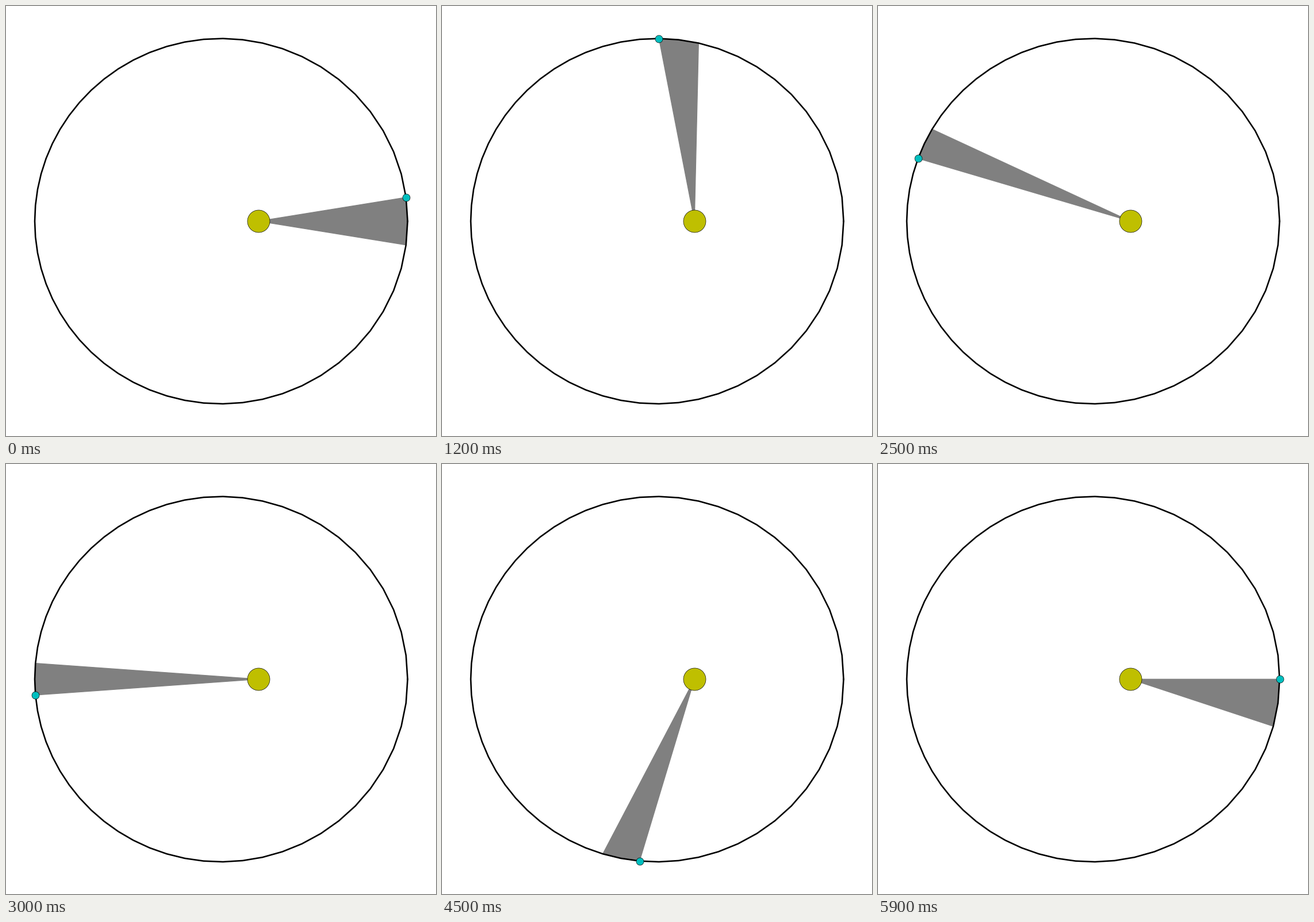
Recreate the animation shown at these times as a matplotlib script. Size 748 px wide and 748 px high, loop 6000 ms.

```python
import numpy as np
import matplotlib.pyplot as plt
from matplotlib.animation import FuncAnimation

SIZE = 748
DPI = 93.5
STEPS = 60
CENTER = 374.3
SEMI_MAJOR = 324.3
ECC = 0.2
SEMI_MINOR = SEMI_MAJOR * np.sqrt(1 - ECC ** 2)
FOCUS = (CENTER + ECC * SEMI_MAJOR, CENTER)


def position(step):
    """Point on the orbit after a number of equal time steps."""
    mean = 2 * np.pi * np.asarray(step) / STEPS
    anomaly = mean
    for _ in range(40):  # Kepler's equation by fixed-point iteration
        anomaly = mean + ECC * np.sin(anomaly)
    return (CENTER + SEMI_MAJOR * np.cos(anomaly),
            CENTER - SEMI_MINOR * np.sin(anomaly))


def sector(step):
    """Area swept between the previous and the next step."""
    rim = np.column_stack(position(np.arange(step - 1, step + 2)))
    return np.vstack([FOCUS, rim])


fig = plt.figure(figsize=(SIZE / DPI, SIZE / DPI), dpi=DPI, facecolor="white")
ax = fig.add_axes([0, 0, 1, 1])
ax.set_xlim(0, SIZE)
ax.set_ylim(SIZE, 0)
ax.axis("off")

swept = plt.Polygon(sector(0), closed=True, color="0.5", lw=1, zorder=1)
ax.add_patch(swept)
ax.plot(*position(np.arange(STEPS + 1)), color="black", lw=2, zorder=2)

body = dict(marker="o", ls="none", mec="black", mew=0.5, zorder=3)
ax.plot([FOCUS[0]], [FOCUS[1]], ms=30, mfc=(0.75, 0.75, 0), **body)
planet, = ax.plot([], [], ms=10, mfc=(0, 0.75, 0.75), **body)


def update(step):
    x, y = position(step + 1)
    planet.set_data([x], [y])
    swept.set_xy(sector(step))
    return swept, planet


anim = FuncAnimation(fig, update, frames=STEPS, interval=100,
                     repeat=True, repeat_delay=0, blit=False)
plt.show()
```
